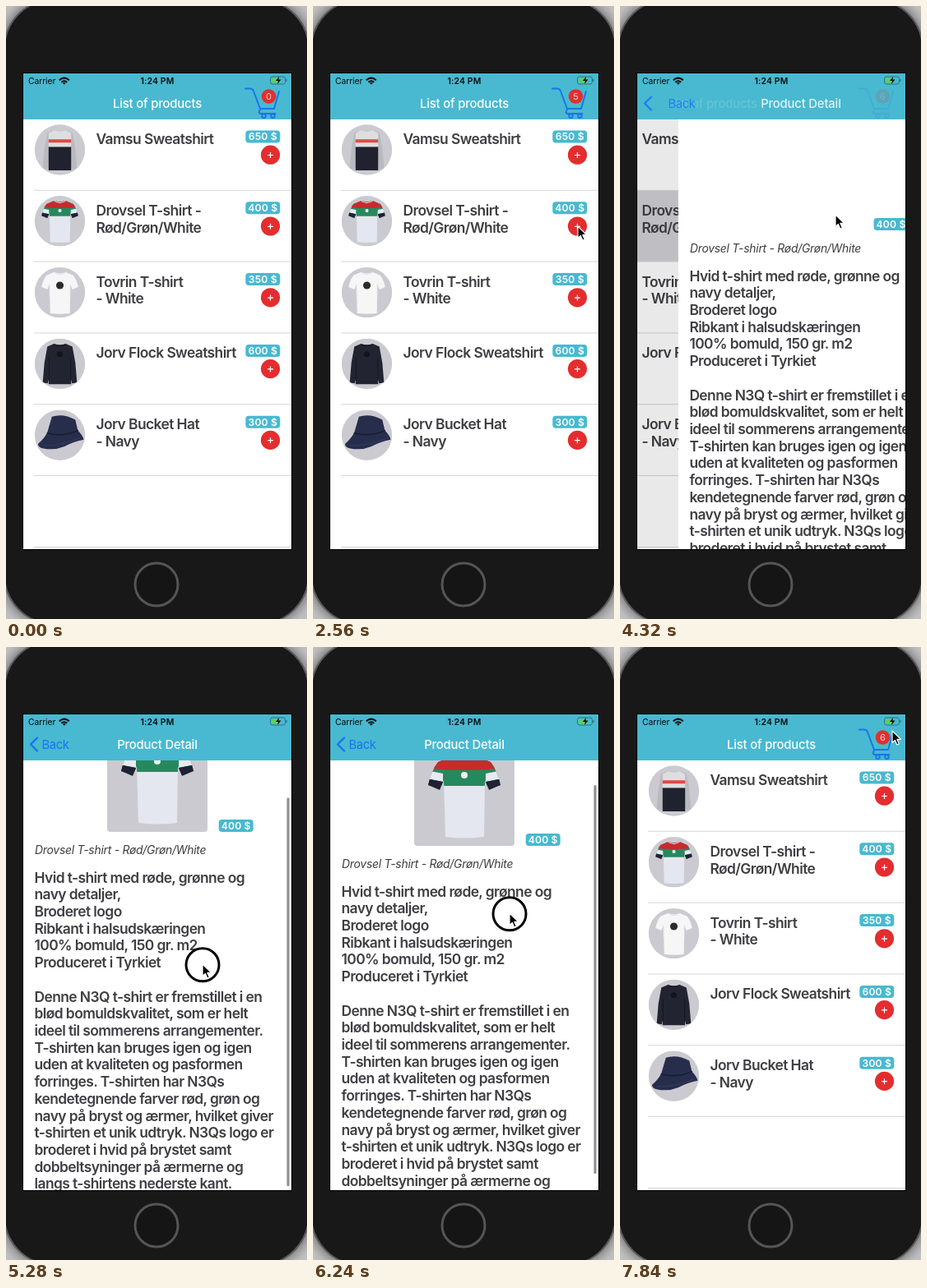
These frames come from a looping animation (366x746 px, 8 s). An HTML page:

```html
<!DOCTYPE html>
<html lang="da">
<head>
<meta charset="utf-8">
<title>Product list</title>
<style>
  html, body { margin: 0; width: 100%; height: 100%; overflow: hidden; background: #c4c4c6; }
  svg { display: block; width: 366px; height: 746px; }
  text { font-family: Inter, "Open Sans", sans-serif; white-space: pre; }
  .strong { font-size: 17.4px; font-weight: 600; letter-spacing: -.575px; fill: #3e3e43; }
  .caption { font-size: 13.9px; font-style: italic; letter-spacing: -.25px; fill: #3e3e43; }
  .price { font-size: 12.2px; font-weight: 600; letter-spacing: .15px; fill: #fff; text-anchor: middle; }
  .title { font-size: 14.8px; font-weight: 500; letter-spacing: -.16px; fill: #fff; text-anchor: middle; }
  .back { font-size: 14.8px; letter-spacing: -.4px; fill: #1476f2; }
  .status { font-size: 10.4px; fill: #0a0a0a; }
  .line { fill: none; stroke-linecap: round; stroke-linejoin: round; }
</style>
</head>
<body>
<svg viewBox="0 0 366 746">
  <defs>
    <filter id="blur" x="-20%" y="-20%" width="140%" height="140%"><feGaussianBlur stdDeviation="9"/></filter>
    <clipPath id="screen"><rect x="21" y="82" width="326" height="579"/></clipPath>
    <clipPath id="disc"><circle cx="31" cy="31" r="30.7"/></clipPath>
    <clipPath id="rounded"><rect width="122" height="122" rx="4"/></clipPath>
    <clipPath id="teeShape"><path id="teePath" d="M48 12Q61 18 74 12L93 20Q101 30 105 48L91 54 86 42 85 111Q61 114 38 111L36 42 31 54 17 48Q21 30 29 20Z"/></clipPath>
    <path id="sweaterPath" d="M47 13Q61 18 75 13L91 20 98 58 102 106 90 108 88 98V110H34V98L32 108 20 106 24 58 31 20Z"/>

    <symbol id="sweater" viewBox="0 0 122 122">
      <rect width="122" height="122" fill="#cbcad0"/>
      <use href="#sweaterPath" fill="#b9babe"/>
      <path d="M47 14Q61 19 75 14L88 21V54H34V21Z" fill="#dedee1"/>
      <path d="M34 36h54v8H34z" fill="#df4a42"/>
      <path d="M34 54h54v56H34z" fill="#20222f"/>
    </symbol>
    <symbol id="tee" viewBox="0 0 122 122">
      <rect width="122" height="122" fill="#cbcad0"/>
      <g clip-path="url(#teeShape)">
        <rect width="122" height="122" fill="#e4e7ef"/>
        <path d="M0 0h122v49H0z" fill="#26895e"/>
        <path d="M0 0h122v25Q61 35 0 25z" fill="#c92a2b"/>
        <path d="M0 27l35 7v10L0 37zM122 27l-35 7v10l35-7z" fill="#e8eaf0"/>
        <path d="M0 37l35 7v16H0zM122 37l-35 7v16h35z" fill="#1f2233"/>
      </g>
      <path class="line" d="M48 13Q61 21 74 13" stroke="#e8e4e4" stroke-width="2"/>
      <circle cx="61" cy="36" r="4" fill="#eef4f1"/>
    </symbol>
    <symbol id="plainTee" viewBox="0 0 122 122">
      <rect width="122" height="122" fill="#cbcad0"/>
      <use href="#teePath" fill="#f6f6f7"/>
      <path class="line" d="M48 13Q61 22 74 13M36 42v30M86 42v30" stroke="#dcdce0" stroke-width="2"/>
      <circle cx="61" cy="44" r="9" fill="#2b2b2d"/>
    </symbol>
    <symbol id="darkSweater" viewBox="0 0 122 122">
      <rect width="122" height="122" fill="#cbcad0"/>
      <use href="#sweaterPath" fill="#222531"/>
      <path class="line" d="M35 48v52M87 48v52M48 15Q61 22 74 15" stroke="#14161e" stroke-width="2"/>
      <circle cx="61" cy="38" r="7" fill="#12141b"/>
    </symbol>
    <symbol id="hat" viewBox="0 0 122 122">
      <rect width="122" height="122" fill="#cbcad0"/>
      <path d="M42 17Q68 8 98 24L104 50Q116 62 118 72 96 76 72 88 48 98 22 93 8 90 9 82 26 66 31 54Z" fill="#272e4c"/>
      <path class="line" d="M31 56Q70 66 104 50" stroke="#171c33" stroke-width="3"/>
      <path class="line" d="M20 86Q60 88 110 68" stroke="#343c5e" stroke-width="2"/>
    </symbol>
  </defs>

  <rect width="366" height="746" fill="#c4c4c6"/>
  <rect x="-2" y="-8" width="370" height="760" rx="60" fill="#3c3c3e" filter="url(#blur)"/>
  <rect x="-2" y="-8" width="370" height="760" rx="60" fill="#181818" stroke="#5b5b5d" stroke-width="2"/>
  <circle cx="183" cy="704" r="26" fill="#151515" stroke="#555557" stroke-width="3"/>
  <rect x="20" y="81" width="328" height="581" fill="#000"/>

  <g clip-path="url(#screen)">
    <g id="list"><rect x="21" y="138" width="326" height="523" fill="#fff"/></g>
    <rect id="dim" x="21" y="138" width="326" height="523" fill="#000"/>
    <g id="detail">
      <rect x="21" y="138" width="326" height="523" fill="#fff"/>
      <g id="content">
        <g id="photo" transform="translate(123 151)" clip-path="url(#rounded)"><use href="#tee" width="122" height="122"/></g>
      </g>
      <rect id="thumb" x="341.5" y="140" width="3" height="473" rx="1.5" fill="#8d8d91"/>
    </g>

    <rect x="21" y="82" width="326" height="56" fill="#48b9d0"/>
    <text id="listTitle" class="title" x="184" y="124">List of products</text>
    <text id="detailTitle" class="title" x="184" y="124">Product Detail</text>
    <path id="chevron" class="line" d="M38 110.500l-8 8 8 8" stroke="#1476f2" stroke-width="2.400"/>
    <text id="backLabel" class="back" x="43.500" y="124">Back</text>
    <g id="cart">
      <g class="line" stroke="#1b74ee" stroke-width="2">
        <path d="M291 100.500h6q3 0 4 3l8 21.500h17l6-21M309.500 125q-4 6 1 6h17"/>
        <circle cx="313.500" cy="133.800" r="2.300"/><circle cx="324.500" cy="133.800" r="2.300"/>
      </g>
      <circle cx="319.500" cy="110" r="8.800" fill="#e0302f"/>
      <text id="count" x="319.500" y="114" font-size="11" fill="#f3cfcf" text-anchor="middle">0</text>
    </g>

    <text class="status" x="27" y="94.500" letter-spacing="-.1">Carrier</text>
    <text class="status" x="184" y="94.500" font-weight="600" letter-spacing=".15" text-anchor="middle">1:24 PM</text>
    <g class="line" stroke="#0a0a0a" stroke-width="2" style="stroke-linecap:butt">
      <path d="M64.800 90.200q6-5.200 12 0M67.300 92.800q3.500-3 7 0"/>
      <path d="M68.800 93.800q2-1.500 4 0l-2 2z" fill="#0a0a0a" stroke="none"/>
    </g>
    <rect x="321.500" y="86" width="18" height="9" rx="2.500" fill="none" stroke="#2f7482"/>
    <path d="M341 89v3" stroke="#2f7482" stroke-width="1.300"/>
    <rect x="323" y="87.500" width="10" height="6" rx="1" fill="#5fcf5c"/>
    <path d="M332 86l-4 5h3l-1 4 4.500-5.500h-3z" fill="#0a0a0a"/>
  </g>

  <circle id="ring" r="20" fill="none" stroke="#000" stroke-width="3"/>
  <path id="cursor" d="M0 0V14.500L3.400 11.400 5.800 17 8.300 16 5.900 10.400H10.500Z" fill="#000" stroke="#fff" stroke-width="1.200" stroke-linejoin="round"/>
</svg>
<script>
const LOOP = 8000, STEP = 160, ROW = 86.8;
const el = id => document.getElementById(id);

const products = [
  ['sweater', 650, 'Vamsu Sweatshirt'],
  ['tee', 400, 'Drovsel T-shirt -', 'Rød/Grøn/White'],
  ['plainTee', 350, 'Tovrin T-shirt', '- White'],
  ['darkSweater', 600, 'Jorv Flock Sweatshirt'],
  ['hat', 300, 'Jorv Bucket Hat', '- Navy']
];
const description = `Hvid t-shirt med røde, grønne og
navy detaljer,
Broderet logo
Ribkant i halsudskæringen
100% bomuld, 150 gr. m2
Produceret i Tyrkiet

Denne N3Q t-shirt er fremstillet i en
blød bomuldskvalitet, som er helt
ideel til sommerens arrangementer.
T-shirten kan bruges igen og igen
uden at kvaliteten og pasformen
forringes. T-shirten har N3Qs
kendetegnende farver rød, grøn og
navy på bryst og ærmer, hvilket giver
t-shirten et unik udtryk. N3Qs logo er
broderet i hvid på brystet samt
dobbeltsyninger på ærmerne og
langs t-shirtens nederste kant.`.split('\n');

const lines = (rows, x, y) => rows.map((row, i) =>
  `<text class="strong" x="${x}" y="${y + i * 20.72}">${row}</text>`).join('');
const price = (value, x, y) =>
  `<rect x="${x - 21}" y="${y - 7.5}" width="42" height="15" rx="4" fill="#48b9d0"/>
   <text class="price" x="${x}" y="${y + 4.4}">${value} $</text>`;
const rule = y => `<path d="M34 ${y}H347" stroke="#d6d6d9"/>`;

const rowMarkup = ([art, value, ...name], i) => `<g transform="translate(0 ${138 + i * ROW})">
  ${i === 1 ? '<rect id="highlight" x="21" width="326" height="86" fill="#d1d1d5"/>' : ''}
  <g transform="translate(34.5 6)" clip-path="url(#disc)"><use href="#${art}" width="62" height="62"/></g>
  ${lines(name, 109.5, 30)}${price(value, 312.3, 21)}
  <circle cx="321.5" cy="43.2" r="11.6" fill="#e32d2e"/>
  <path d="M318 43.500h7M321.500 40v7" stroke="#fff" stroke-width="1.200"/>
  ${rule(86.3)}</g>`;

el('list').insertAdjacentHTML('beforeend', products.map(rowMarkup).join('') + rule(658.5));
el('content').insertAdjacentHTML('beforeend',
  `<text class="caption" x="35" y="300">Drovsel T-shirt - Rød/Grøn/White</text>
   ${price(400, 279.7, 265.5)}${lines(description, 34.5, 334.5)}`);

// Each table row: time, then values reached at that time.
const pointer = [
  [480, 366, 240], [800, 322, 186], [1760, 322, 184], [2080, 322, 268], [3040, 322, 268],
  [3680, 262, 254], [4320, 262, 254], [4800, 239, 434], [4960, 239, 432], [5280, 239, 386],
  [5440, 239, 380], [5760, 239, 380], [6080, 239, 300], [6240, 239, 324], [6400, 239, 355],
  [6560, 220, 330], [7040, 50, 127], [7360, 50, 127], [7520, 110, 121], [7680, 250, 107], [7840, 331, 102]
];
const scroll = [[4960, 0], [5280, 48], [5440, 55], [6080, 55], [6240, 31], [6400, 0]];
const push = [[4000, 0], [4160, .47], [4320, .847], [4480, .98], [4640, 1],
  [7200, 1], [7360, .6], [7520, .15], [7680, .02], [7840, 0]];
const taps = [960, 1280, 1600, 2080, 2400, 2720];
const presses = [...taps.map(t => [t, t]), [3840, 3840], [4960, 5440], [6080, 6400]];

function at(table, t) {
  const next = table.findIndex(row => row[0] > t);
  if (next === 0) return table[0].slice(1);
  if (next < 0) return table[table.length - 1].slice(1);
  const a = table[next - 1], b = table[next], k = (t - a[0]) / (b[0] - a[0]);
  return a.slice(1).map((v, i) => v + (b[i + 1] - v) * k);
}
const move = (id, x, y = 0) => el(id).setAttribute('transform', `translate(${x} ${y})`);
const fade = (id, value) => { el(id).style.opacity = value; };

function draw(t) {
  const [p] = at(push, t), [offset] = at(scroll, t), [x, y] = at(pointer, t);
  move('list', -98 * p);
  fade('dim', .1 * p);
  move('detail', 326 * (1 - p));
  move('content', 0, -offset);
  move('thumb', 0, offset * .9);
  fade('thumb', t >= 4960 && t < 7520 ? 1 : 0);
  fade('photo', t >= 4480 ? 1 : 0);
  fade('highlight', t < 3840 ? 0 : t < 7520 ? 1 : Math.min(1, p * 3));

  move('listTitle', -84 * p);
  fade('listTitle', 1 - p);
  move('detailTitle', 235 * (1 - p));
  fade('detailTitle', p);
  move('backLabel', 98 * (1 - p));
  fade('backLabel', p);
  fade('chevron', p);
  fade('cart', 1 - p);
  el('count').textContent = taps.filter(tap => t >= tap).length;

  move('cursor', x, y);
  fade('cursor', t >= 480 ? 1 : 0);
  move('ring', x, y + .8);
  fade('ring', presses.some(([from, to]) => t >= from && t <= to) ? 1 : 0);
}

const start = performance.now();
function tick() {
  const t = (performance.now() - start) % LOOP;
  draw(Math.floor(t / STEP) * STEP);
  requestAnimationFrame(tick);
}
tick();
</script>
</body>
</html>
```
